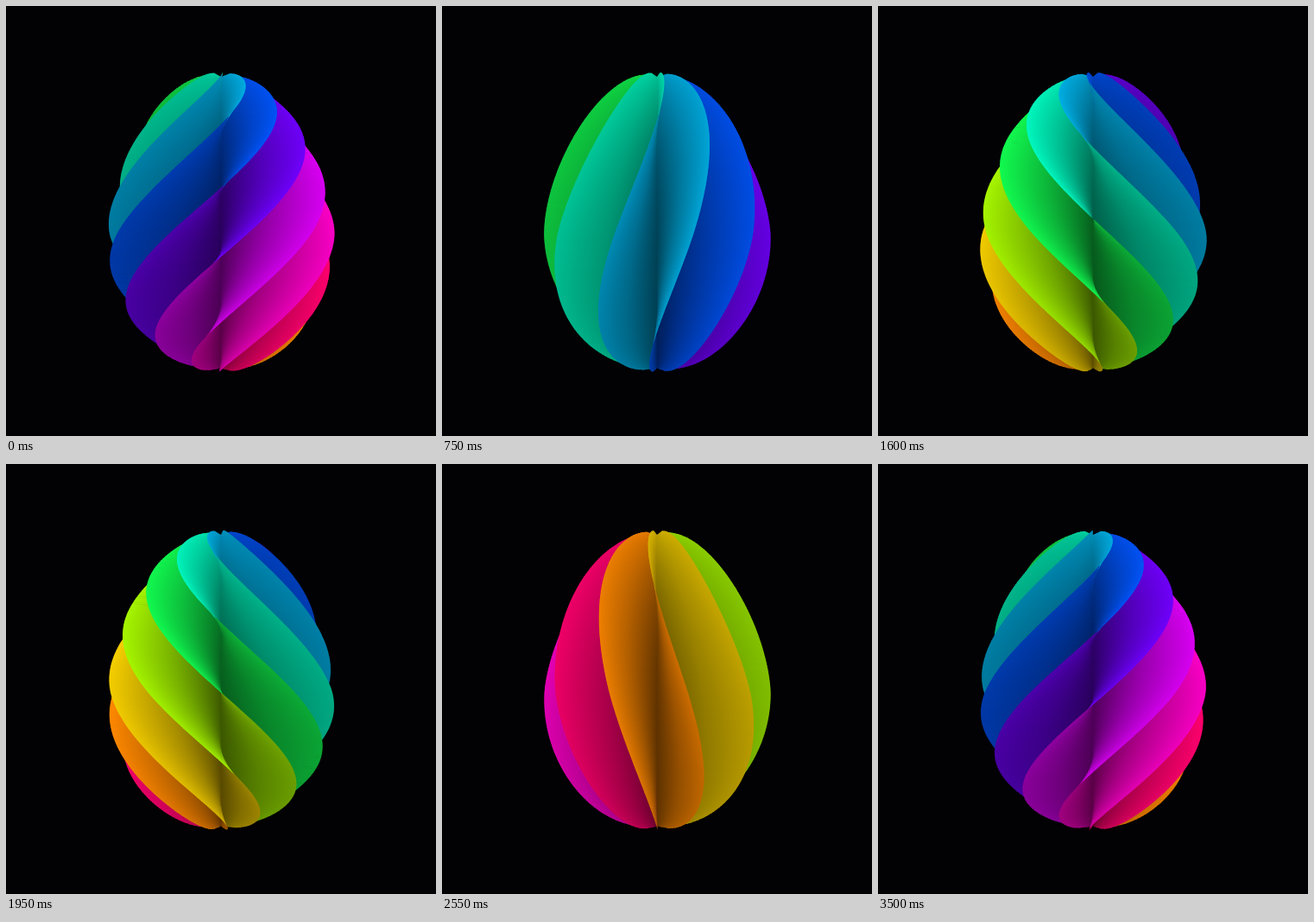
Recreate the animation shown at these times as an HTML page with a canvas. Size 498 by 498 pixels, loop 3.55 s.

```html
<!DOCTYPE html>
<html lang="en">
<head>
<meta charset="utf-8">
<title>Twisting paper egg</title>
<style>
  html, body { margin: 0; width: 100%; height: 100%; overflow: hidden; background: #020103; }
  canvas { display: block; }
</style>
</head>
<body>
<canvas id="stage" width="498" height="498"></canvas>
<script>
const ctx = document.getElementById('stage').getContext('2d');

const LOOP = 3550, TICK = 50;
const CX = 249, CY = 250, CAMERA = 590;
const TOP = 80, WAIST = 266, BOTTOM = 419, RADIUS = 128.5;
const ROW = 2, OVERLAP = 0.8;

// Colour of each cell between two neighbouring fins, going right.
const CELLS = [
  [218, 116, 0], [204, 172, 0], [138, 204, 0], [14, 208, 66],
  [0, 208, 160], [0, 150, 196], [0, 70, 208], [92, 0, 208],
  [178, 0, 200], [208, 0, 164], [218, 0, 94]
];
const FINS = CELLS.length;
const STEP = 2 * Math.PI / FINS;

const TWIST = 0.0159;   // cells per pixel of height
const PIVOT = 305;

function radiusAt(y) {
  const upper = y < WAIST;
  const s = upper ? (WAIST - y) / (WAIST - TOP) : (y - WAIST) / (BOTTOM - WAIST);
  return RADIUS * Math.sqrt(Math.max(0, 1 - Math.pow(s, upper ? 1.62 : 2)));
}

function poseAt(time) {
  const x = 2 * Math.PI * time / LOOP;
  const sway = -0.08 - 0.15 * Math.sin(x) + 0.15 * Math.sin(2 * x)
             + 0.09 * Math.cos(2 * x) + 0.06 * Math.cos(x);
  return {
    front: 8.3 - FINS * time / LOOP + sway,
    twist: TWIST * Math.cos(x - 0.07)
  };
}

function rimPoint(y, fin, pose) {
  const r = radiusAt(y);
  const angle = (fin - pose.front - pose.twist * (y - PIVOT)) * STEP;
  const scale = CAMERA / (CAMERA - r * Math.cos(angle));
  return {
    r, angle,
    x: CX + r * Math.sin(angle) * scale,
    y: CY + (y - CY) * scale
  };
}

function shade(color, light) {
  return 'rgb(' + color.map(c => Math.min(255, Math.round(c * light))).join(',') + ')';
}

function buildStrips(pose) {
  const strips = [];
  for (let y = TOP; y < BOTTOM; y += ROW) {
    const next = Math.min(BOTTOM, y + ROW + OVERLAP);
    for (let fin = 0; fin < FINS; fin++) {
      const a = rimPoint(y, fin, pose);
      const depth = Math.cos(a.angle);
      if (depth < -0.6) continue;
      strips.push({ y, next, fin, depth, a, b: rimPoint(next, fin, pose) });
    }
  }
  return strips.sort((p, q) => p.depth - q.depth);
}

function drawStrip({ y, next, fin, a, b }, pose) {
  const slope = -pose.twist * STEP;
  const facing = -0.6 * a.r * slope * (CY - y) - CAMERA * Math.sin(a.angle);
  const side = facing > 0 ? 1 : -1;
  const cell = side > 0 ? fin : fin - 1;
  const color = CELLS[(cell + FINS) % FINS];

  // The folds are dark at the axis, but light reaches them near the top.
  const drop = (y - TOP) / (BOTTOM - TOP);
  const core = 0.42 + 0.5 * Math.pow(1 - drop, 4);
  const rim = 1.03 - 0.18 * Math.pow(drop, 3);

  const paint = ctx.createLinearGradient(CX, y, a.x, a.y);
  for (const q of [0, 0.5, 1]) {
    const lean = q * a.r * slope;
    const up = side * lean / Math.hypot(1, lean);
    const open = core + (rim - core) * Math.pow(q, 0.85);
    paint.addColorStop(q, shade(color, open * (1 + 0.25 * up)));
  }
  ctx.fillStyle = paint;
  ctx.beginPath();
  ctx.moveTo(CX, y);
  ctx.lineTo(a.x, a.y);
  ctx.lineTo(b.x, b.y);
  ctx.lineTo(CX, next);
  ctx.fill();
}

function draw(time) {
  const pose = poseAt(time);
  ctx.fillStyle = '#020103';
  ctx.fillRect(0, 0, 498, 498);
  for (const strip of buildStrips(pose)) drawStrip(strip, pose);
}

let shown = -1;
function frame() {
  const time = Math.floor(performance.now() % LOOP / TICK) * TICK;
  if (time !== shown) {
    draw(time);
    shown = time;
  }
  requestAnimationFrame(frame);
}
frame();
</script>
</body>
</html>
```
